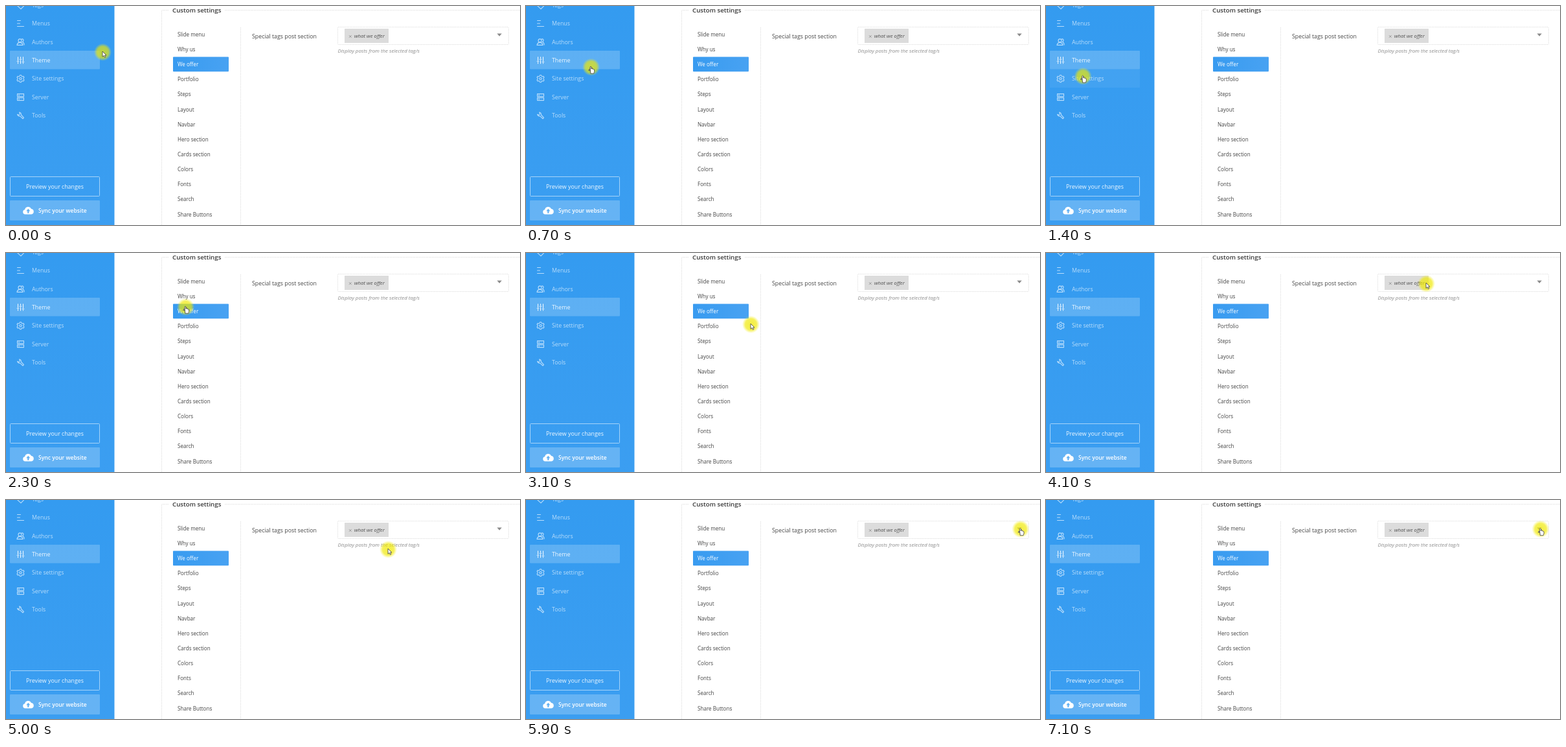
Recreate the animation shown at these times as an HTML page. Size 794 by 338 pixels, loop 7.7 s.

```html
<!DOCTYPE html>
<html lang="en">
<head>
<meta charset="utf-8">
<title>Theme settings</title>
<style>
  html, body { margin: 0; width: 100%; height: 100%; overflow: hidden; background: #fff; }
  svg { display: block; width: 794px; height: 338px; font-family: "Open Sans", "Noto Sans", sans-serif; }
  .nav { font-size: 8.8px; fill: #b9ddfb; }
  .nav.on { fill: #eff8ff; }
  .tab { font-size: 8.1px; fill: #444; }
  .tab.on { fill: #fff; }
  .icon { fill: none; stroke: #b9ddfb; stroke-width: 1.1; stroke-linecap: round; stroke-linejoin: round; }
  .icon.on { stroke: #eff8ff; }
  .rule { fill: none; stroke: #e2e2e2; stroke-dasharray: 1.5 1; }
  .pointer { fill: #fff; stroke: #3d3d3d; stroke-width: .8; stroke-linejoin: round; }
</style>
</head>
<body>
<svg viewBox="0 0 794 338" xmlns="http://www.w3.org/2000/svg">
  <defs>
    <linearGradient id="side" x2="0" y2="1">
      <stop stop-color="#349bf0"/><stop offset="1" stop-color="#3b9ef1"/>
    </linearGradient>
    <linearGradient id="active" x2="1">
      <stop stop-color="#389bf0"/><stop offset="1" stop-color="#48a2f2"/>
    </linearGradient>
    <radialGradient id="glow">
      <stop stop-color="#efe800" stop-opacity=".74"/>
      <stop offset=".65" stop-color="#f0e900" stop-opacity=".66"/>
      <stop offset="1" stop-color="#f5ee20" stop-opacity="0"/>
    </radialGradient>
  </defs>

  <!-- Sidebar -->
  <rect width="167.5" height="338" fill="url(#side)"/>
  <rect x="6" y="69" width="139" height="28.5" rx="1" fill="#fff" fill-opacity=".2"/>
  <rect id="hover" x="6" y="97.5" width="139" height="28.5" fill="#fff" fill-opacity=".06"/>
  <g id="nav"></g>
  <rect x="6.5" y="263.5" width="138" height="30" rx="1" fill="none" stroke="#a5d3f9"/>
  <text class="nav on" x="31" y="282.4">Preview your changes</text>
  <rect x="6" y="300" width="139" height="31" rx="1" fill="#fff" fill-opacity=".22"/>
  <path d="M29.5 321.5a3.7 3.7 0 0 1-.4-7.3a5.2 5.2 0 0 1 9.8-1.2a4.3 4.3 0 0 1 .4 8.5z" fill="#fff"/>
  <path d="M34.3 313l3 3.4h-1.9v3.4h-2.2v-3.4h-1.9z" fill="#5fb0f4"/>
  <text x="50" y="319.2" font-size="8.6" font-weight="600" fill="#fff">Sync your website</text>

  <!-- Settings panel -->
  <path class="rule" d="M251 6.5H240.5V338M338 6.5H794"/>
  <path class="rule" d="M362.5 33V338"/>
  <text x="257" y="10.1" font-size="9.7" font-weight="600" fill="#383838">Custom settings</text>
  <rect x="258" y="78.5" width="86" height="22.7" rx="1" fill="url(#active)"/>
  <g id="tabs"></g>
  <text x="380" y="50.4" font-size="8.8" fill="#484848">Special tags post section</text>
  <rect class="rule" x="512.5" y="32.5" width="264" height="27" rx="1"/>
  <rect x="523" y="35" width="68" height="22" fill="#dcdcdc"/>
  <path d="M530 45.2l3.6 3.6m0-3.6l-3.6 3.6" stroke="#888" stroke-width=".8"/>
  <text x="538" y="49.4" font-size="7.8" font-style="italic" fill="#505050">what we offer</text>
  <path d="M758.5 42.5h7.4l-3.7 4.2z" fill="#8a8a8a"/>
  <text x="512.5" y="72" font-size="7.9" font-style="italic" fill="#8c8c8c">Display posts from the selected tag/s</text>

  <!-- Mouse -->
  <g id="mouse">
    <circle cx=".5" cy="1.3" r="13.5" fill="url(#glow)"/>
    <path id="arrow" class="pointer" d="M0 0V8.3L2 6.5L3.4 9.4L4.8 8.8L3.5 6H6z"/>
    <path id="hand" class="pointer" d="M-.9 .9Q0-.5 .9 .9V4.2Q2-.1 2.7 4.4Q4 3.4 4.4 4.9Q5.5 4.4 5.6 6V8.4Q5.2 9.4 4.7 11.2H-.1Q-1-.1-3.2 6.7Q-2.8 5.4-.9 7z"/>
  </g>
</svg>
<script>
const LOOP = 7700, STEP = 100;
const byId = id => document.getElementById(id);

function add(parent, tag, attrs, text = "") {
  const el = document.createElementNS("http://www.w3.org/2000/svg", tag);
  for (const key in attrs) el.setAttribute(key, attrs[key]);
  el.textContent = text;
  parent.appendChild(el);
}

// Icons are drawn around their own centre.
const nav = [
  ["Tags", "M-5-4V1L.5 6L5 1.5L0-4z"],
  ["Menus", "M-5-4.5H0M-5 0H-1M-5 4.5H5"],
  ["Authors", "M-3.5-2a2.5 2.5 0 1 0 5 0a2.5 2.5 0 1 0-5 0M-5.5 5Q-5 1-1 1T3.5 5zM2-4.5Q5-4.5 4.4-1.8L3 .2Q5.5 1 5.6 4.5"],
  ["Theme", "M-4-5V0M-4 3V5M0-5V-3M0 0V5M4-5V1M4 4V5M-5.3 1.5h2.6M-1.3-1.5h2.6M2.7 2.5h2.6"],
  ["Site settings", "M-1.7 0a1.7 1.7 0 1 0 3.4 0a1.7 1.7 0 1 0-3.4 0M-1-5.5H1L1.5-4L3-3.3L4.5-3.8L5.5-2L4.5-.8V.8L5.5 2L4.5 3.8L3 3.3L1.5 4L1 5.5H-1L-1.5 4L-3 3.3L-4.5 3.8L-5.5 2L-4.5 .8V-.8L-5.5-2L-4.5-3.8L-3-3.3L-1.5-4z"],
  ["Server", "M-5-5H5V-1H-5zM-5 1H5V5H-5zM-3-3h1M-3 3h1"],
  ["Tools", "M-1.8-5Q1.5-4 .8-1L5 3.4L3.6 5L-.9 .8Q-4.2 1.4-5-1.8L-3-.7L-1-2.4z"]
];
nav.forEach(([name, d], i) => {
  const y = 27 + (i - 1) * 28.4, on = name === "Theme" ? " on" : "";
  add(byId("nav"), "path", { class: "icon" + on, d, transform: `translate(22.5 ${y})` });
  add(byId("nav"), "text", { class: "nav" + on, x: 40, y: y + 3.2 }, name);
});

const tabs = ["Slide menu", "Why us", "We offer", "Portfolio", "Steps", "Layout", "Navbar",
  "Hero section", "Cards section", "Colors", "Fonts", "Search", "Share Buttons"];
tabs.forEach((name, i) =>
  add(byId("tabs"), "text", { class: i === 2 ? "tab on" : "tab", x: 265, y: 46.8 + i * 23.15 }, name));

// Mouse path: time, x, y
const path = [
  [0, 149, 70], [300, 140, 73], [900, 80, 103], [1200, 58, 107], [1500, 56, 107],
  [1800, 110, 105], [2200, 268, 84], [2300, 277, 82], [2500, 279, 83], [2800, 318, 99],
  [3100, 347, 109], [3500, 400, 107], [3800, 470, 88], [4000, 538, 64], [4100, 587, 46],
  [4500, 587, 49], [4800, 588, 68], [5000, 590, 75], [5200, 630, 70], [5500, 735, 50],
  [5700, 763.5, 43.5], [LOOP, 763.5, 43.5]
];

function mouseAt(t) {
  const i = path.findIndex(p => p[0] > t);
  const [t0, x0, y0] = path[i - 1], [t1, x1, y1] = path[i];
  const k = (t - t0) / (t1 - t0);
  return [x0 + (x1 - x0) * k, y0 + (y1 - y0) * k];
}

const within = (v, low, high) => v >= low && v <= high;
const show = (id, visible) => byId(id).setAttribute("visibility", visible ? "visible" : "hidden");

function draw(now) {
  const t = Math.floor(now % LOOP / STEP) * STEP;
  const [x, y] = mouseAt(t);
  const onNav = within(x, 6, 145);
  const clickable = onNav || within(x, 258, 344) || within(x, 750, 777);
  byId("mouse").setAttribute("transform", `translate(${x} ${y})`);
  show("hand", clickable);
  show("arrow", !clickable);
  show("hover", onNav && within(y, 97.5, 126));
}

const start = performance.now();
function tick() {
  draw(performance.now() - start);
  requestAnimationFrame(tick);
}
tick();
</script>
</body>
</html>
```
